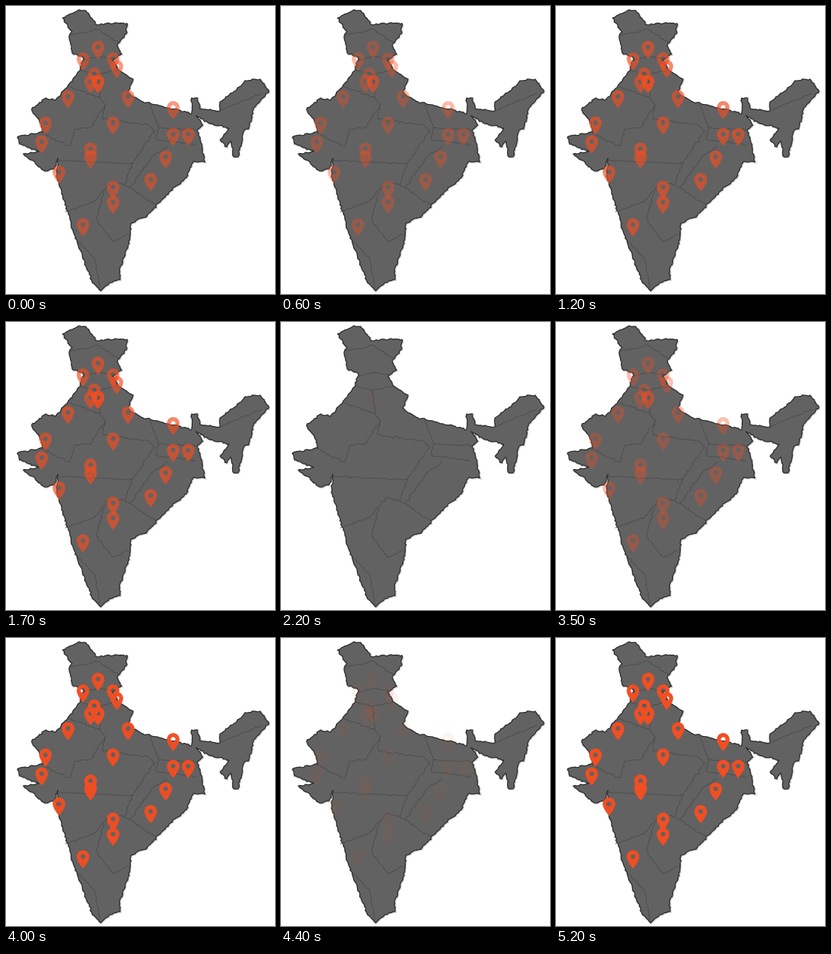
Animation, 358 px wide and 382 px high, one loop 5.3 s. Source, as a matplotlib script:

```python
import numpy as np
import matplotlib.pyplot as plt
from matplotlib.animation import FuncAnimation
from matplotlib.patches import PathPatch, Polygon
from matplotlib.path import Path

W, H, DPI = 358, 382, 100
STEP, FRAMES = 100, 53
LAND, EDGE, BORDER, PIN = "#626262", "#2b2b2b", "#484848", "#f04e23"
rng = np.random.default_rng(4)

NORTH = [
    (75, 16), (97, 5), (106, 6), (121, 25), (138, 23), (161, 23), (160, 37),
    (148, 52), (154, 64), (142, 72), (150, 85), (169, 97), (162, 114),
    (182, 127), (208, 133), (247, 143),
]
NORTHEAST = [
    (247, 122), (255, 122), (258, 136), (285, 139), (285, 127), (304, 113),
    (318, 99), (338, 97), (350, 113), (330, 135), (323, 163), (317, 165),
    (309, 200), (303, 200), (299, 179), (294, 187), (285, 178), (297, 162),
    (269, 155), (253, 145),
]
EAST = [
    (262, 158), (255, 164), (265, 207), (250, 206), (240, 228), (217, 247),
    (188, 278), (166, 288), (164, 315), (151, 350), (152, 363), (138, 367),
    (126, 378),
]
WEST = [
    (114, 364), (90, 301), (74, 246), (67, 226), (69, 202), (64, 216),
    (52, 219), (23, 196), (44, 193), (18, 183), (15, 174), (49, 167),
    (47, 157), (34, 137), (53, 122), (66, 125), (98, 86), (103, 69),
    (88, 62), (84, 40), (88, 34),
]
NORTH_LINES = [
    [(86, 39), (122, 31), (150, 49)],
    [(102, 73), (120, 67), (143, 70)],
    [(98, 84), (122, 91), (149, 85)],
    [(84, 107), (125, 122), (122, 91)],
    [(125, 122), (132, 131), (112, 162), (92, 163), (85, 186), (48, 168)],
    [(132, 131), (129, 150), (190, 158), (198, 166), (168, 209)],
    [(191, 131), (203, 162), (254, 164)],
    [(203, 162), (200, 177), (252, 184)],
    [(285, 139), (340, 116)],
]
SOUTH_LINES = [
    [(67, 205), (168, 209)],
    [(214, 186), (194, 200), (165, 241)],
    [(168, 209), (158, 237), (140, 233), (118, 259), (79, 273)],
    [(130, 247), (121, 284), (142, 312), (163, 303)],
    [(158, 237), (200, 264)],
    [(96, 312), (118, 335), (125, 374)],
]
# Pin columns by row height
PINS = {
    54.5: [122], 70: [102, 142], 80: [147], 90: [117], 100: [112, 122, 122],
    120: [82, 162], 134.5: [222], 155: [52, 142], 170: [222, 242], 180: [47],
    189.5: [112], 200: [112, 212], 220: [70], 230: [192], 240: [142],
    260: [142], 290: [102],
}
# Turning points of the fade in ms: trough, peak, trough, ...
TURNS = [-200, 400, 960, 1570, 2190, 2830, 3360, 3980, 4600, 5200]


def rough(points, amount, closed=False):
    """Subdivide a line and shake the new points to look hand-cut."""
    pts = np.array(points + points[:1] if closed else points, float)
    out = []
    for a, b in zip(pts[:-1], pts[1:]):
        n = max(1, int(np.hypot(*(b - a)) / 2.5))
        seg = a + (b - a) * np.linspace(0, 1, n, endpoint=False)[:, None]
        seg[1:] += rng.uniform(-amount, amount, (n - 1, 2))
        out.append(seg)
    return np.vstack(out + [pts[-1:]])


def pin_path(x, y, s=1.2):
    arc = np.linspace(np.pi, 2 * np.pi, 30)
    p = np.linspace(0, 1, 20)
    tail_x = 7 * (1 - p) ** 2 * (1 + 2 * p)
    tail_y = 15.75 * p * (1 - p) ** 2 + 39 * p ** 2 * (1 - p) + 13 * p ** 3
    xs = np.concatenate([7 * np.cos(arc), tail_x, -tail_x[::-1]])
    ys = np.concatenate([7 * np.sin(arc), tail_y, tail_y[::-1]])
    outer = Path(np.column_stack([xs, ys]) * s + (x, y), closed=True)
    ring = Path.circle((x, y), 2.5 * s)
    return Path.make_compound_path(outer, Path(ring.vertices[::-1], ring.codes))


def ease(u):
    p = np.linspace(0, 1, 101)
    q = 1 - p
    x = 0.75 * q * p + p ** 3
    y = 0.3 * q * q * p + 3 * q * p * p + p ** 3
    return np.interp(u, x, y)


def opacity(t):
    i = min(np.searchsorted(TURNS, t, side="right") - 1, len(TURNS) - 2)
    a = ease((t - TURNS[i]) / (TURNS[i + 1] - TURNS[i]))
    return float(np.clip(1 - a if i % 2 else a, 0, 1))


fig = plt.figure(figsize=(W / DPI, H / DPI), dpi=DPI, facecolor="white")
ax = fig.add_axes([0, 0, 1, 1])
ax.set(xlim=(0, W), ylim=(H, 0))
ax.axis("off")

coast = rough(NORTH + NORTHEAST + EAST + WEST, 1.1, closed=True)
ax.add_patch(Polygon(coast + (0.6, 0.6), fc="none", ec="#d8d8d8", lw=1.8))
ax.add_patch(Polygon(coast, fc=LAND, ec=EDGE, lw=0.9))
for line in NORTH_LINES + SOUTH_LINES:
    ax.plot(*rough(line, 1.2).T, color=BORDER, lw=0.55)

pins = [ax.add_patch(PathPatch(pin_path(x + 0.5, y), fc=PIN, ec="none", zorder=5))
        for y, row in PINS.items() for x in row]


def draw(i):
    t = 0 if i < 2 else i * STEP
    for pin in pins:
        pin.set_alpha(opacity(t))
    return pins


anim = FuncAnimation(fig, draw, frames=FRAMES, interval=STEP, repeat=True,
                     repeat_delay=0)
plt.show()
```
